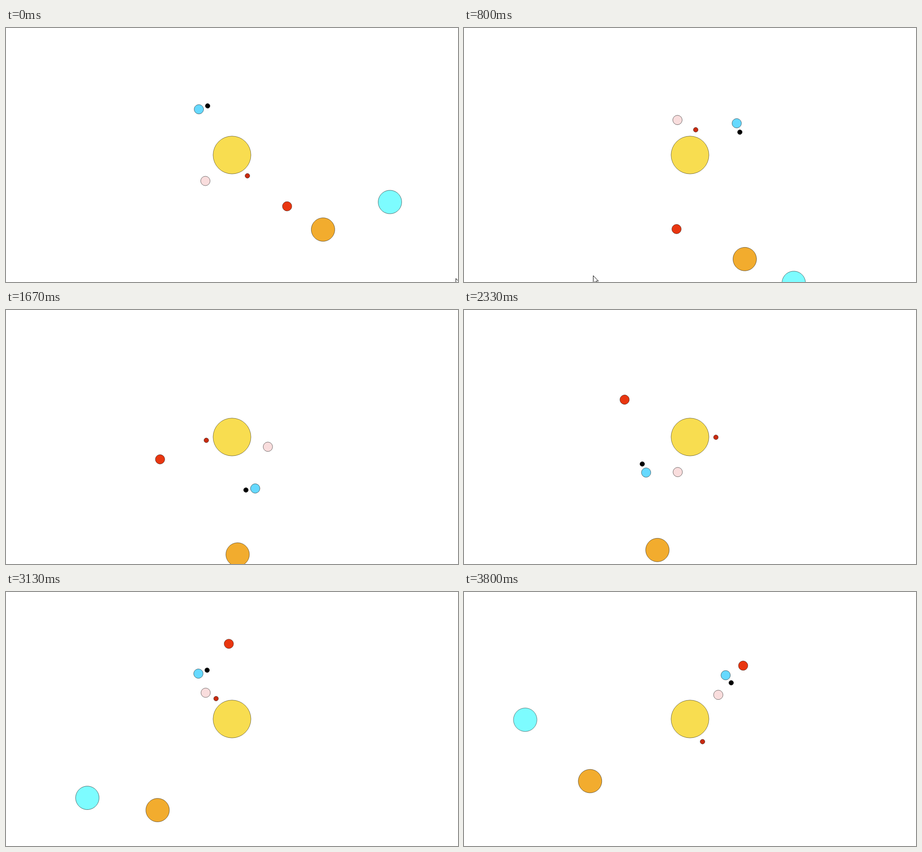
Animation, 960 px wide and 540 px high, one loop 3.87 s. Source, as an HTML page without scripts:

```html
<!DOCTYPE html>
<html lang="en">
<head>
<meta charset="utf-8">
<title>Orbits</title>
<style>
  /* --n counts ticks, --p is the phase of the blue planet in degrees */
  @property --n { syntax: "<number>"; inherits: true; initial-value: 0; }
  @property --p { syntax: "<number>"; inherits: true; initial-value: 0; }

  html, body { margin: 0; width: 100%; height: 100%; overflow: hidden; background: #fff; }
  svg {
    display: block;
    width: 960px;
    height: 540px;
    animation: clock 3.87s -7ms infinite;
  }
  circle { stroke: #000; stroke-width: .5; }

  /* --a start angle, --k speed relative to the blue planet */
  .orbit { transform: rotate(calc(1deg * (var(--a) + var(--k) * var(--p)))); }

  .pointer {
    fill: #fff;
    stroke: #000;
    transform: translate(
      calc(1px * (955 - 60.875 * var(--n) + .34375 * var(--n) * var(--n))),
      calc(1px * (532 - 39.875 * var(--n) + 3.28125 * var(--n) * var(--n))));
  }

  @keyframes clock {
    0%      { --n: 0;  --p: 0;      animation-timing-function: steps(4); }
    6.8966% { --n: 4;  --p: 30.75;  animation-timing-function: steps(8); }
    20.69%  { --n: 12; --p: 91.7;   animation-timing-function: steps(13); }
    43.103% { --n: 25; --p: 191.65; animation-timing-function: steps(10); }
    60.345% { --n: 35; --p: 266.85; animation-timing-function: steps(12); }
    81.034% { --n: 47; --p: 359.4;  animation-timing-function: steps(10); }
    98.276% { --n: 57; --p: 435.04; animation-timing-function: steps(1); }
    100%    { --n: 58; --p: 442.7; }
  }
</style>
</head>
<body>
<svg viewBox="0 0 960 540">
  <g transform="translate(480 270)">
    <circle r="40.2" fill="#f8dd50"/>
    <g class="orbit" style="--a:53.5; --k:2.5"><circle cx="55" r="5" fill="#c92b10"/></g>
    <g class="orbit" style="--a:135.7; --k:1.25"><circle cx="79" r="10" fill="#f9dddd"/></g>
    <g class="orbit" style="--a:234.1; --k:1">
      <circle cx="120" r="10" fill="#66d9ff"/>
      <circle cx="114.9" cy="19.3" r="5"/>
    </g>
    <g class="orbit" style="--a:42.97; --k:.625"><circle cx="160" r="10" fill="#e93610"/></g>
    <g class="orbit" style="--a:39.35; --k:.25"><circle cx="250" r="25" fill="#f2ac2e"/></g>
    <g class="orbit" style="--a:16.6; --k:.375"><circle cx="350" r="25" fill="#7dfcff"/></g>
  </g>
  <path class="pointer" d="M.5 .5V16.5L4 13 6.5 18.5 8.5 17.5 6.5 12H11.5Z"/>
</svg>
</body>
</html>
```
